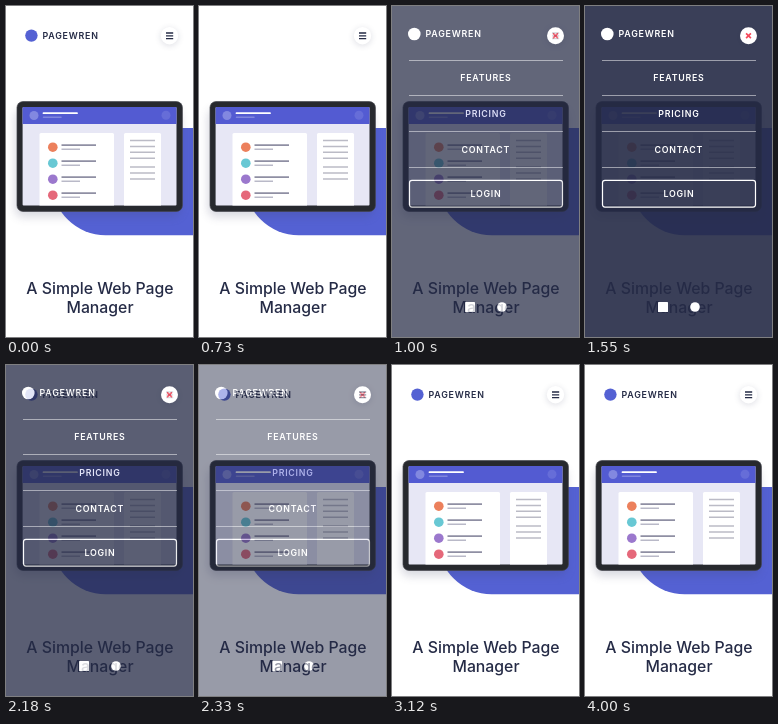
Write an HTML page that moves like this. It is 187 by 331 pixels and loops after 4.12 s.

```html
<!DOCTYPE html>
<html lang="en">
<head>
<meta charset="utf-8">
<title>Mobile menu</title>
<style>
  html, body { margin: 0; width: 100%; height: 100%; overflow: hidden; background: #fff; }
  svg { display: block; width: 100%; height: 100%; }
  text { font-family: Inter, Roboto, sans-serif; font-weight: 600; }
  .brand { font-size: 8.9px; letter-spacing: .75px; }
  .title { font-size: 15.8px; font-weight: 500; fill: #252b46; text-anchor: middle; }
  .item { font-size: 8.8px; letter-spacing: .75px; fill: #fff; text-anchor: middle; }
</style>
</head>
<body>
<svg viewBox="0 0 187 331" preserveAspectRatio="none">
  <defs>
    <filter id="soft" x="-30%" y="-30%" width="160%" height="160%">
      <feGaussianBlur stdDeviation="5"/>
    </filter>
    <filter id="glow" x="-60%" y="-60%" width="220%" height="220%">
      <feGaussianBlur stdDeviation="3"/>
    </filter>
    <clipPath id="screen"><rect x="16.6" y="101" width="153.9" height="98.4" rx="1"/></clipPath>
  </defs>

  <rect width="187" height="331" fill="#fff"/>

  <!-- page -->
  <rect x="46" y="122" width="220" height="107.3" rx="53.65" fill="#5461d3"/>
  <rect x="9" y="103" width="166" height="108" rx="8" fill="#3c4266" opacity=".2" filter="url(#soft)"/>
  <rect x="11" y="95.6" width="165.4" height="109.8" rx="6" fill="#27292e" stroke="#44464c" stroke-width=".7"/>
  <g clip-path="url(#screen)">
    <rect x="16" y="101" width="155" height="99" fill="#e7e7f5"/>
    <rect x="16" y="101" width="155" height="17" fill="#535bd2"/>
    <circle cx="28" cy="109.5" r="4.5" fill="#8288e0"/>
    <circle cx="160" cy="109.3" r="4.5" fill="#666dd8"/>
    <path d="M37.5 107.2H71" stroke="#fff" stroke-width="1.8" stroke-linecap="round"/>
    <path d="M37.5 111.3H55" stroke="#8086df" stroke-width="1.5" stroke-linecap="round"/>
    <rect x="33.5" y="127" width="74.5" height="80" rx="1.5" fill="#fff"/>
    <rect x="118" y="127" width="37" height="80" rx="1.5" fill="#fff"/>
    <g id="rows"></g>
  </g>
  <text class="title" x="94" y="288">A Simple Web Page</text>
  <text class="title" x="94" y="307">Manager</text>

  <g id="brand">
    <circle cx="25.4" cy="29.6" r="6.2" fill="#5461d3"/>
    <text class="brand" x="36.6" y="33" fill="#252b46">PAGEWREN</text>
  </g>
  <circle cx="163.5" cy="31" r="9" fill="#3c4266" opacity=".16" filter="url(#glow)"/>
  <circle cx="163.5" cy="29.7" r="8.7" fill="#fff"/>
  <path d="M160 27H167.2M160 29.8H167.2M160 32.6H167.2" stroke="#252b46" stroke-width="1.3"/>

  <!-- menu -->
  <g id="menu">
    <rect width="187" height="331" fill="#252b46" opacity=".9"/>
    <circle cx="22.3" cy="28" r="6.3" fill="#fff"/>
    <text class="brand" x="33.6" y="31.3" fill="#fff">PAGEWREN</text>
    <circle cx="163.5" cy="29.7" r="8.5" fill="#fff"/>
    <path d="M161.1 27.3L165.9 32.1M165.9 27.3L161.1 32.1" stroke="#f5485a" stroke-width="1.7"/>
    <g id="items"></g>
    <rect x="17.5" y="174.3" width="153" height="26.8" rx="2.5" fill="none" stroke="#fff" stroke-width="1.2"/>
    <rect x="73" y="296" width="10" height="10" rx=".6" fill="#fff"/>
    <circle cx="110" cy="301" r="4.8" fill="#fff"/>
  </g>
</svg>
<script>
const LOOP = 4120;
const EASE = [.25, .1, .25, 1];
const EASE_IN_OUT = [.42, 0, .58, 1];
const OPEN = { start: 755, length: 500, curve: EASE };
const CLOSE = { start: 1975, length: 730, curve: EASE_IN_OUT };
const HIDE_BRAND = 730;
const SHOW_BRAND = 2000;

const byId = id => document.getElementById(id);
const rows = byId('rows'), items = byId('items');
const brand = byId('brand'), menu = byId('menu');

function add(parent, tag, attrs, text) {
  const el = document.createElementNS('http://www.w3.org/2000/svg', tag);
  for (const key in attrs) el.setAttribute(key, attrs[key]);
  if (text) el.textContent = text;
  parent.appendChild(el);
}

function line(parent, x1, x2, y, stroke, width) {
  add(parent, 'path', { d: `M${x1} ${y}H${x2}`, stroke, 'stroke-width': width });
}

['#ec805c', '#68c8d4', '#9b78cd', '#e5687a'].forEach((fill, i) => {
  const y = 141.2 + i * 16;
  add(rows, 'circle', { cx: 46.8, cy: y, r: 4.8, fill });
  line(rows, 55.5, 90, y - 2.1, '#8f8fa3', 1.6);
  line(rows, 55.5, 74, y + 2, '#b9b9c8', 1.5);
});
for (let i = 0; i < 7; i++) {
  line(rows, 124, 149, 134.5 + i * 5.9 + (i > 3 ? 3 : 0), '#bbbbc6', 1.5);
}

['FEATURES', 'PRICING', 'CONTACT', 'LOGIN'].forEach((label, i) => {
  line(items, 17, 171, Math.floor(54 + i * 35.8) + .5, 'rgba(255,255,255,.5)', 1);
  add(items, 'text', { class: 'item', x: 93.9, y: i < 3 ? 75.3 + i * 35.7 : 190.8 }, label);
});

// cubic Bézier easing, solved for x by bisection
function ease(x, [x1, y1, x2, y2]) {
  if (x <= 0) return 0;
  if (x >= 1) return 1;
  const curve = (a, b, u) => 3 * a * u * (1 - u) ** 2 + 3 * b * u * u * (1 - u) + u ** 3;
  let lo = 0, hi = 1;
  for (let i = 0; i < 24; i++) {
    const mid = (lo + hi) / 2;
    if (curve(x1, x2, mid) < x) lo = mid; else hi = mid;
  }
  return curve(y1, y2, lo);
}

const progress = (step, t) => ease((t - step.start) / step.length, step.curve);

function draw(t) {
  menu.setAttribute('opacity', progress(OPEN, t) - progress(CLOSE, t));
  const hidden = t >= HIDE_BRAND && t < SHOW_BRAND;
  brand.setAttribute('visibility', hidden ? 'hidden' : 'visible');
}

const begin = performance.now();
function tick() {
  draw((performance.now() - begin) % LOOP);
  requestAnimationFrame(tick);
}
tick();
</script>
</body>
</html>
```
